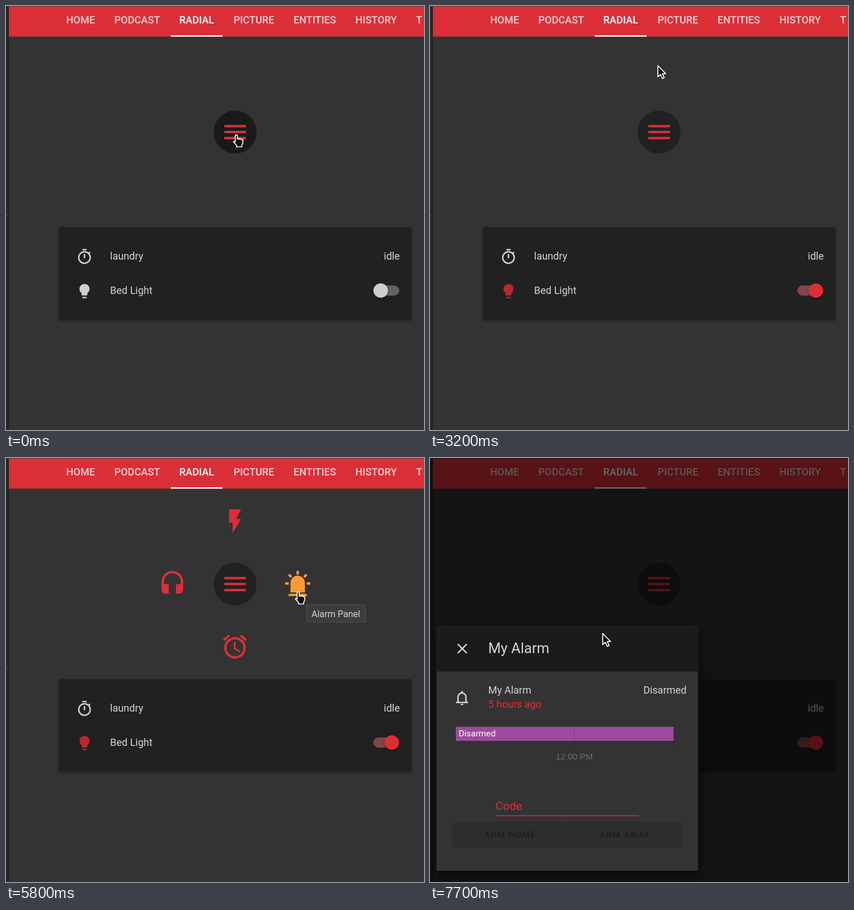
Recreate the animation shown at these times as an HTML page. Size 743 px wide and 754 px high, loop 8 s.

```html
<!DOCTYPE html>
<html lang="en">
<head>
<meta charset="utf-8">
<title>Radial menu</title>
<style>
html, body { margin: 0; width: 100%; height: 100%; overflow: hidden; background: #333; }
svg { display: block; }
text { font: 18px Roboto, sans-serif; fill: #d4d4d4; }
.tabs text { font-weight: 500; fill: #f5cfd1; }
.tabs .active { fill: #fff; }
.small { font-size: 15.4px; }
.arm { font-size: 15.4px; font-weight: 500; letter-spacing: 1.4px; text-anchor: middle; fill: #1e1e1e; }
.end { text-anchor: end; }
.red { fill: #db2f38; }
.grey { fill: #d0d0d0; }
.card { filter: drop-shadow(0 2px 2px #0005); }
.dialog { filter: drop-shadow(0 10px 14px #0009); }
.cursor path { fill: #111; stroke: #fff; stroke-width: 1.7; stroke-linejoin: round; }
</style>
</head>
<body>
<svg width="743" height="754" viewBox="0 0 743 754">
  <rect width="743" height="754" fill="#333"/>
  <rect width="4" height="754" fill="#272727"/>
  <rect x="4" width="1" height="754" fill="#1c1c1c"/>
  <rect y="372" width="4" height="1" fill="#484848"/>

  <g class="tabs">
    <rect class="red" x="5" width="738" height="54.5"/>
    <rect width="743" height="1" fill="#4a3436"/>
    <text x="107" y="31">HOME</text>
    <text x="192.5" y="31">PODCAST</text>
    <text x="308" y="31" class="active">RADIAL</text>
    <text x="404.5" y="31">PICTURE</text>
    <text x="511" y="31">ENTITIES</text>
    <text x="621" y="31">HISTORY</text>
    <text x="729" y="31">T</text>
    <rect x="293" y="52" width="92" height="2.5" fill="#fff"/>
  </g>

  <rect class="card" x="94" y="393.5" width="626.5" height="164" rx="2.5" fill="#212121"/>
  <path class="grey" transform="translate(139.5 446) scale(1.28) translate(-12 -12)" d="M12 20A7 7 0 0 1 5 13A7 7 0 0 1 19 13A7 7 0 0 1 12 20M19.03 7.39L20.45 5.97C20 5.46 19.55 5 19.04 4.56L17.62 6C16.07 4.74 14.12 4 12 4A9 9 0 0 0 3 13A9 9 0 0 0 12 22C17 22 21 17.97 21 13C21 10.88 20.26 8.93 19.03 7.39M11 14H13V8H11M15 1H9V3H15Z"/>
  <text x="185" y="451">laundry</text>
  <text x="700" y="451" class="end">idle</text>
  <path id="bulb" transform="translate(139.5 507) scale(1.28) translate(-12 -12)" d="M12 2A7 7 0 0 0 5 9C5 11.38 6.19 13.47 8 14.74V17A1 1 0 0 0 9 18H15A1 1 0 0 0 16 17V14.74C17.81 13.47 19 11.38 19 9A7 7 0 0 0 12 2M9 21A1 1 0 0 0 10 22H14A1 1 0 0 0 15 21V20H9Z"/>
  <text x="185" y="512">Bed Light</text>
  <rect id="track" x="653" y="497" width="46" height="18" rx="9"/>
  <circle id="knob" class="card" cy="506" r="12.8"/>

  <g id="menu" class="red">
    <path transform="translate(407 112.5) scale(2.13) translate(-12 -12)" id="bolt" d="M7 2V13H10V22L17 10H13L17 2Z"/>
    <path transform="translate(295.7 224.2) scale(2.13) translate(-12 -12)" d="M12 1C7 1 3 5 3 10V17A3 3 0 0 0 6 20H9V12H5V10A7 7 0 0 1 19 10V12H15V20H18A3 3 0 0 0 21 17V10C21 5 16.97 1 12 1Z"/>
    <path transform="translate(518.5 224.2) scale(2.13) translate(-12 -12)" id="siren" d="M6 6.9L3.87 4.78L5.28 3.37L7.4 5.5ZM13 1V4H11V1ZM20.13 4.78L18 6.9L16.6 5.5L18.72 3.37ZM4.5 10.5V12.5H1.5V10.5ZM19.5 10.5H22.5V12.5H19.5ZM6 20H18A2 2 0 0 1 20 22H4A2 2 0 0 1 6 20M12 5A6 6 0 0 1 18 11V19H6V11A6 6 0 0 1 12 5Z"/>
    <path transform="translate(407 335.5) scale(2.13) translate(-12 -12)" d="M12 20A7 7 0 0 1 5 13A7 7 0 0 1 19 13A7 7 0 0 1 12 20M12 4A9 9 0 0 0 3 13A9 9 0 0 0 21 13A9 9 0 0 0 12 4M12.5 8H11V14L15.75 16.85L16.5 15.62L12.5 13.25ZM7.88 3.39L6.6 1.86L2 5.71L3.29 7.24ZM22 5.72L17.4 1.86L16.11 3.39L20.71 7.25Z"/>
  </g>
  <circle id="button" cx="407.2" cy="224.2" r="38.2"/>
  <path class="red" transform="translate(407.2 224.2) scale(2.13) translate(-12 -12)" d="M3 6H21V8H3ZM3 11H21V13H3ZM3 16H21V18H3Z"/>

  <g id="tip">
    <rect id="tipBox" height="31" rx="2" fill="#3d3d3d" stroke="#555"/>
    <text id="tipText" x="9" y="21.5" style="font-size:16px"></text>
  </g>

  <g id="modal">
    <rect width="743" height="754" fill="#000" opacity=".6"/>
    <rect class="dialog" x="11.5" y="298" width="465" height="436" rx="2.5" fill="#333"/>
    <path d="M11.5 379.5V300.5a2.5 2.5 0 0 1 2.5-2.5H474a2.5 2.5 0 0 1 2.5 2.5V379.5Z" fill="#1b1b1b"/>
    <path class="grey" transform="translate(57.3 339) scale(1.28) translate(-12 -12)" d="M19 6.41L17.59 5L12 10.59L6.41 5L5 6.41L10.59 12L5 17.59L6.41 19L12 13.41L17.59 19L19 17.59L13.41 12Z"/>
    <text x="103.5" y="347" style="font-size:25.6px">My Alarm</text>
    <path class="grey" transform="translate(57.5 427) scale(1.28) translate(-12 -12)" d="M16 17H7V10.5C7 8 9 6 11.5 6C14 6 16 8 16 10.5M18 16V10.5C18 7.43 15.86 4.86 13 4.18V3.5A1.5 1.5 0 0 0 10 3.5V4.18C7.13 4.86 5 7.43 5 10.5V16L3 18V19H20V18M11.5 22A2 2 0 0 0 13.5 20H9.5A2 2 0 0 0 11.5 22Z"/>
    <text x="103.5" y="418.5">My Alarm</text>
    <text x="456" y="418.5" class="end">Disarmed</text>
    <text x="103.5" y="444" style="fill:#db2f38">5 hours ago</text>
    <rect x="46" y="478" width="387" height="25" fill="#9d4b9c"/>
    <rect x="256" y="473" width="1" height="44" fill="#000" opacity=".2"/>
    <rect x="433" y="473" width="1" height="38" fill="#000" opacity=".1"/>
    <text x="51" y="494.5" class="small" style="fill:#fff">Disarmed</text>
    <text x="256.5" y="536" text-anchor="middle" style="font:15.4px 'Liberation Sans',sans-serif;fill:#6e6e6e">12:00 PM</text>
    <text x="116.5" y="626" style="font-size:20.5px;fill:#db2f38">Code</text>
    <rect class="red" x="117" y="635.5" width="254.5" height="1.5"/>
    <rect x="40" y="647" width="204" height="45.5" rx="5" fill="#2d2d2d"/>
    <rect x="244" y="647" width="204" height="45.5" rx="5" fill="#2d2d2d"/>
    <text x="142.5" y="675" class="arm">ARM HOME</text>
    <text x="346.5" y="675" class="arm">ARM AWAY</text>
  </g>

  <g id="cursor" class="cursor">
    <path id="arrow" d="M1 1V21L5.6 16.6L9 24L12.3 22.6L9.2 15.3H15Z"/>
    <path id="hand" transform="translate(-6 0)" d="M4.5 13.5V3A1.9 1.9 0 0 1 8.3 3V9A1.8 1.8 0 0 1 11.7 9.2A1.7 1.7 0 0 1 15 10A1.6 1.6 0 0 1 18 11.3V15.5L16 20V22.5H7V20L1.4 13.6A1.7 1.7 0 0 1 4.5 13.5Z"/>
  </g>
</svg>
<script>
const LOOP = 8000, STEP = 100, RED = '#db2f38', ORANGE = '#ff9933';
const $ = id => document.getElementById(id);
const set = (id, attrs) => {
  for (const k in attrs) $(id).setAttribute(k, attrs[k]);
};
const show = (id, on) => set(id, { display: on ? 'inline' : 'none' });

// time, x, y of the hot spot, pointing hand or not
const moves = [
  [0, 409, 228, 1], [1200, 408, 190, 1], [1300, 407, 150, 0], [1400, 405, 118, 1],
  [1500, 404, 105, 1], [3200, 404, 105, 0], [3800, 410, 173, 0], [4100, 414, 230, 1],
  [5000, 470, 228, 0], [5300, 521, 237, 1], [5500, 519, 237, 1], [6700, 519, 238, 0],
  [7700, 306, 311, 0]
];

function menuScale(t) {
  if (t < 700 || t >= 7400) return 0;
  if (t < 3200) return 1 - (1 - Math.min(1, (t - 640) / 400)) ** 2;
  if (t < 4700) return 0;
  return t < 6700 ? 1 : 0.74;
}

function draw(now) {
  const t = Math.floor(now % LOOP / STEP) * STEP;
  const within = (from, to) => t >= from && t < to;

  const s = menuScale(t);
  set('menu', { opacity: s, transform: `translate(407.2 224.2) scale(${s}) translate(-407.2 -224.2)` });
  set('bolt', { fill: within(1400, 3200) ? ORANGE : RED });
  set('siren', { fill: t >= 5300 ? ORANGE : RED });

  const pressed = within(4300, 4700);
  set('button', { r: pressed ? 42.3 : 38.2, fill: pressed || t < 1200 ? '#1a1a1a' : '#212121' });

  const lit = t >= 3200;
  set('bulb', { fill: lit ? '#b8292f' : '#d0d0d0' });
  set('track', { fill: lit ? '#84454a' : '#636363' });
  set('knob', { cx: lit ? 686 : 666, fill: lit ? RED : '#cfcfcf' });

  const boltTip = within(1800, 3200);
  show('tip', boltTip || within(5800, 6700));
  set('tip', { transform: boltTip ? 'translate(419 128)' : 'translate(534 261)' });
  set('tipBox', { width: boltTip ? 124 : 105 });
  $('tipText').textContent = boltTip ? 'Toggle Lights' : 'Alarm Panel';

  show('modal', t >= 7400);

  const [, x, y, hand] = moves.findLast(m => m[0] <= t);
  set('cursor', { transform: `translate(${x} ${y})` });
  show('hand', hand);
  show('arrow', !hand);
}

const start = performance.now();
function tick() {
  draw(performance.now() - start);
  requestAnimationFrame(tick);
}
tick();
</script>
</body>
</html>
```
